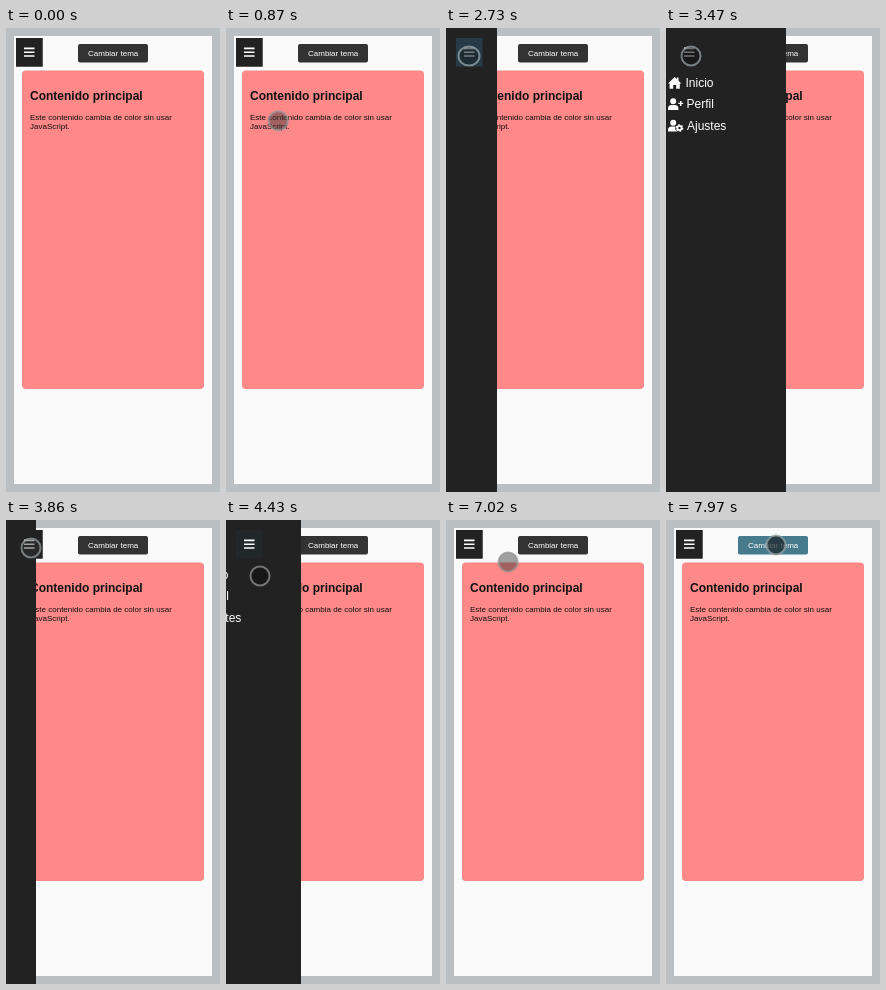
An HTML page that plays this animation: 214x464 px, repeating every 8 s.

```html
<!DOCTYPE html>
<html lang="es">
<head>
<meta charset="utf-8">
<title>Menú lateral</title>
<style>
html, body { margin: 0; width: 100%; height: 100%; overflow: hidden; background: #babfc2; }
svg { display: block; width: 100vw; height: 100vh; font-family: "Liberation Sans", Arial, sans-serif; }
.menu, .toggle, .theme, .cursor, .ring { animation: 8s linear infinite; }
.menu { animation-name: slide; }
.toggle { fill: #222; animation-name: toggle; }
.theme { fill: #333; animation-name: theme; }
.cursor { animation-name: move; }
.ring { fill: rgba(50,50,50,.45); stroke: rgba(145,145,145,.75); stroke-width: 2; animation-name: press; }

@keyframes slide {
  0%, 33.125% { transform: translateX(-136px); }
  34.125%, 34.875% { transform: translateX(-85px); }
  35.875%, 41.99% { transform: translateX(0); }
  42% { transform: translateX(-3px); }
  43.375%, 45.875% { transform: translateX(-16px); }
  48.25%, 49.49% { transform: translateX(-106px); }
  50%, 54.375% { transform: translateX(-136px); }
  55.375%, 56.49% { transform: translateX(-61px); }
  56.5% { transform: translateX(-26px); animation-timing-function: ease-out; }
  58%, 77.37% { transform: translateX(0); }
  77.375%, 78.24% { transform: translateX(-10px); }
  78.25% { transform: translateX(-26px); animation-timing-function: ease-out; }
  81.125%, 100% { transform: translateX(-136px); }
}
@keyframes move {
  0%, 6.74% { opacity: 0; transform: translate(98px,170px); }
  6.75% { opacity: 0; transform: translate(98px,170px); }
  8% { opacity: 1; }
  12%, 14% { opacity: 1; transform: translate(40px,72px); }
  16.625%, 19.25% { transform: translate(11px,36px); }
  21.5%, 22.49% { transform: translate(15px,30px); }
  23.75%, 28.625% { transform: translate(26px,29px); }
  30%, 35.875% { transform: translate(23px,28px); }
  42%, 54.375% { transform: translate(25px,28px); }
  55.375%, 56.49% { transform: translate(34px,56px); }
  60%, 61.875% { transform: translate(42px,62px); }
  64% { transform: translate(46px,77px); }
  67% { transform: translate(45px,97px); }
  71%, 72.24% { transform: translate(30px,44px); }
  72.25%, 81.125% { transform: translate(30px,26px); }
  85.625%, 87.75% { transform: translate(62px,42px); }
  92.875%, 100% { opacity: 1; transform: translate(110px,25px); }
}
@keyframes press {
  0%, 32.5% { fill: rgba(50,50,50,.45); rx: 9.5px; }
  34.125%, 34.875% { fill: rgba(25,35,40,.6); stroke: rgba(145,160,166,.8); rx: 10.5px; }
  35.875%, 41.9% { fill: rgba(50,50,50,.45); rx: 9.5px; }
  42%, 43.375% { fill: rgba(20,20,20,.6); }
  45.875%, 54.375% { fill: rgba(50,50,50,.45); }
  55.375%, 56.5% { fill: rgba(20,20,20,.75); }
  58%, 98% { fill: rgba(50,50,50,.45); stroke: rgba(145,145,145,.75); }
  99.625%, 100% { fill: rgba(25,35,40,.7); stroke: rgba(145,160,166,.8); }
}
@keyframes toggle {
  0%, 32.4% { fill: #222; }
  34.125%, 34.875% { fill: #263b45; }
  36.5%, 54.375% { fill: #222; }
  55.375%, 56.5% { fill: #22282a; }
  58%, 100% { fill: #222; }
}
@keyframes theme {
  0%, 97.9% { fill: #333; }
  99.625%, 100% { fill: #467a8c; }
}
</style>
</head>
<body>
<svg viewBox="0 0 214 464" preserveAspectRatio="none">
  <rect width="214" height="464" fill="#babfc2"/>
  <rect x="8" y="8" width="198" height="448" fill="#fafafa"/>

  <rect class="theme" x="72" y="16" width="70" height="18.5" rx="2"/>
  <text x="82" y="28" font-size="8" fill="#fff">Cambiar tema</text>

  <rect x="16" y="42.5" width="182" height="318.5" rx="4" fill="#ff8888"/>
  <g fill="#111">
    <text x="24" y="72" font-size="12" font-weight="bold">Contenido principal</text>
    <text font-size="8"><tspan x="24" y="91.5">Este contenido cambia de color sin usar</tspan><tspan x="24" y="100.5">JavaScript.</tspan></text>
  </g>

  <rect class="toggle" x="10" y="10" width="26.5" height="28.5"/>

  <g class="menu">
    <rect x="-4" width="140" height="464" fill="#222"/>
    <g fill="#fff" font-size="12">
      <path d="M18 55.5 24.7 49l2.1 2v-1.5h1.7v3.2l2.9 2.8h-1.6v5.3h-3.6v-3.7h-3v3.7h-3.6v-5.3z"/>
      <text x="35.5" y="59">Inicio</text>

      <g id="person">
        <circle cx="23.2" cy="73.2" r="3"/>
        <path d="M18 82v-1.5q0-3.5 3.5-3.5h3.4q3.5 0 3.5 3.5V82z"/>
      </g>
      <path d="M28.2 75.4h5M30.7 72.9v5" stroke="#fff" stroke-width="1.4"/>
      <text x="36.5" y="80">Perfil</text>

      <use href="#person" y="21.5"/>
      <circle cx="29.5" cy="100" r="4.3" fill="#222"/>
      <circle cx="29.5" cy="100" r="2.1" fill="none" stroke="#fff" stroke-width="1.8"/>
      <circle cx="29.5" cy="100" r="3.2" fill="none" stroke="#fff" stroke-width="1.3" stroke-dasharray="1.7 1.65"/>
      <text x="37" y="102">Ajustes</text>
    </g>
  </g>

  <rect class="toggle" x="10" y="10" width="26.5" height="28.5"/>
  <path d="M18 20.4h10.5M18 24.2h10.5M18 28h10.5" stroke="#fff" stroke-width="1.6"/>

  <g class="cursor"><ellipse class="ring" rx="9.5" ry="9.5"/></g>
</svg>
</body>
</html>
```
